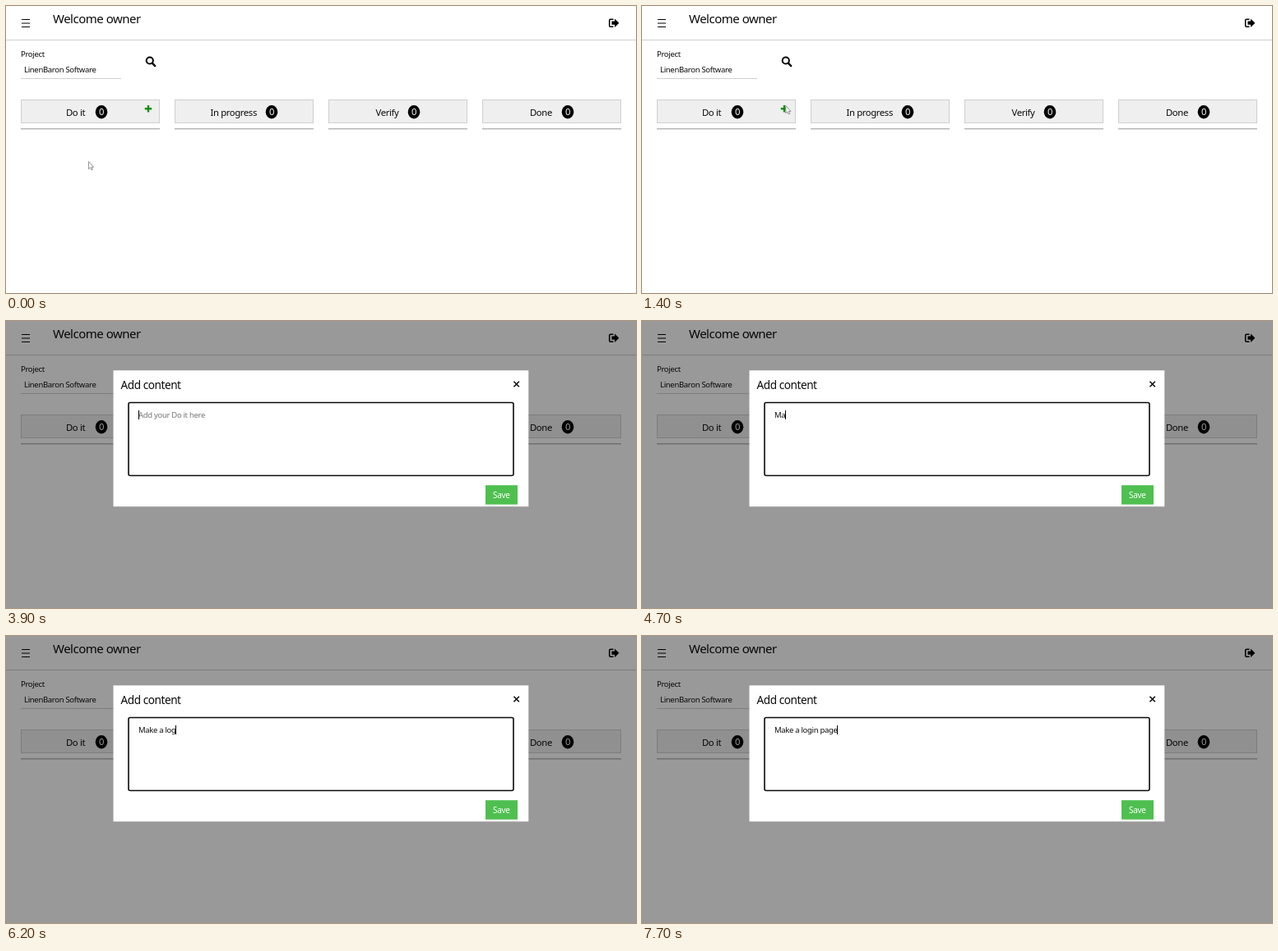
An HTML page that plays this animation: 766x350 px, repeating every 8 s.

```html
<!DOCTYPE html>
<html lang="en">
<head>
<meta charset="utf-8">
<title>Task board</title>
<style>
  html, body { margin: 0; width: 100%; height: 100%; overflow: hidden; background: #fff; }
  svg { display: block; width: 766px; height: 350px; }
  text { font-family: "Noto Sans", "Open Sans", sans-serif; letter-spacing: -.033em; white-space: pre; fill: #0b0b0b; }
  .small { font-size: 9.5px; }
  .heading { font-size: 11.3px; }
  .line { fill: none; stroke: #000; }
</style>
</head>
<body>
<svg viewBox="0 0 766 350">
  <path class="line" d="M19 16.5h10M19 21h10M19 25.5h10" stroke-width="1.2"/>
  <text x="57" y="21" font-size="15">Welcome owner</text>
  <path class="line" d="M738.5 16.2H735q-1.3 0-1.3 1.3v6.4q0 1.3 1.3 1.3h3.5" stroke-width="1.5"/>
  <path d="M736.5 18.6h3.6v-3.1l5.3 5.2-5.3 5.2v-3.1h-3.6z"/>
  <path d="M0 41h766v1H0z" fill="#d0d0d0"/>

  <text class="small" x="18" y="62">Project</text>
  <text class="small" x="22" y="80.5">LinenBaron Software</text>
  <path d="M18 88h122v1H18z" fill="#d0d0d0"/>
  <circle class="line" cx="174.8" cy="66.5" r="4.1" stroke-width="2"/>
  <path class="line" d="M177.8 69.6l3.4 3.5" stroke-width="2.4" stroke-linecap="round"/>

  <g id="columns"></g>
  <path d="M173 121v8.4M168.8 125.2h8.4" stroke="#159015" stroke-width="2.4"/>
  <path id="pointer" d="M0 0V9.2L2.1 7.3 3.6 10.4 5 9.7 3.6 6.8H6.2Z" fill="#fff" stroke="#777" stroke-width=".8"/>

  <g id="dialog">
    <path d="M0 0h766v350H0z" opacity=".4"/>
    <path d="M130.5 60.3H635.3V226.2H130.5z" fill="#fff"/>
    <text x="139.5" y="83" font-size="13.6">Add content</text>
    <path class="line" d="M617.5 73.7l6.4 6.6M623.9 73.7l-6.4 6.6" stroke-width="1.4"/>
    <rect id="field" x="149" y="99.5" width="468" height="89" rx="2" fill="#fff"/>
    <text id="entry" class="small" x="161" y="118"></text>
    <path id="caret" d="M0 109h1v11H0z"/>
    <path d="M583 200.3h39v23.4h-39z" fill="#4fbf50"/>
    <text x="592" y="215.8" font-size="10" style="fill:#fff">Save</text>
  </g>
</svg>
<script>
const LOOP = 8000, OPEN = 1700, FOCUS = 3900;
const MESSAGE = "Make a login page";
const KEY_TIMES = [4400, 4500, 4900, 5000, 5200, 5500, 5600, 5800, 6100,
                   6200, 6300, 6400, 6900, 7100, 7300, 7400, 7500];
const $ = id => document.getElementById(id);

// title, title x, badge centre
const columns = [["Do it", 73, 116], ["In progress", 248.5, 323],
                 ["Verify", 449.5, 496], ["Done", 637, 683]];
$("columns").innerHTML = columns.map(([title, x, badge], i) => {
  const left = 18 + i * 187;
  return `<rect x="${left + .5}" y="114.5" width="168" height="28" fill="#efefef" stroke="#cfcfcf"/>
    <path d="M${left} 149h169v1.5h-169z" fill="#b9b6b9"/>
    <text class="heading" x="${x}" y="133.5">${title}</text>
    <ellipse cx="${badge}" cy="129.3" rx="7.3" ry="8.2"/>
    <text class="heading" x="${badge}" y="133.3" text-anchor="middle" style="fill:#fff">0</text>`;
}).join("");

// The pointer moves in 100 ms steps, passing just above the plus before settling on it.
function pointerAt(t) {
  const step = Math.floor(t / 100) - 3;
  if (step >= 8) return [174.8, 121.6];
  const p = Math.max(0, step) / 7, ease = p * p * (3 - 2 * p);
  return [100.4 + 75 * ease, 189.6 - 74 * ease];
}

function draw(t) {
  const open = t >= OPEN, focused = t >= FOCUS;
  $("pointer").setAttribute("visibility", open ? "hidden" : "visible");
  $("pointer").setAttribute("transform", `translate(${pointerAt(t)})`);
  $("dialog").setAttribute("visibility", open ? "visible" : "hidden");
  if (!open) $("caret").setAttribute("visibility", "hidden");

  const typed = MESSAGE.slice(0, KEY_TIMES.filter(k => k <= t).length);
  const entry = $("entry");
  entry.textContent = typed || "Add your Do it here";
  entry.style.fill = typed ? "#0b0b0b" : "#757575";
  $("field").setAttribute("stroke", focused ? "#0b0b0b" : "#b8b8b8");
  $("field").setAttribute("stroke-width", focused ? 1.6 : 1.3);

  const end = typed ? entry.getComputedTextLength() : 0;
  $("caret").setAttribute("visibility", focused ? "visible" : "hidden");
  $("caret").setAttribute("transform", `translate(${Math.round(160.7 + end)})`);
}

function frame() {
  draw(performance.now() % LOOP);
  requestAnimationFrame(frame);
}
frame();
</script>
</body>
</html>
```
